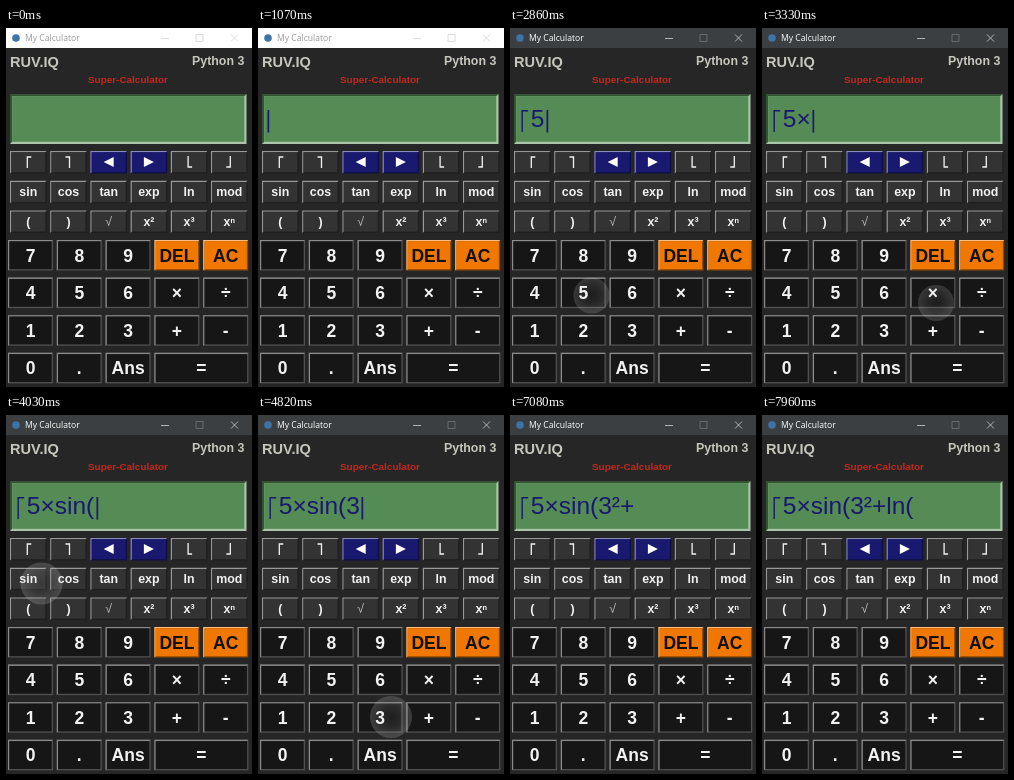
Write an HTML page that moves like this. It is 246 px wide and 359 px high and loops after 8 s.

```html
<!DOCTYPE html>
<html lang="en">
<head>
<meta charset="utf-8">
<title>My Calculator</title>
<style>
html, body { margin: 0; width: 100%; height: 100%; overflow: hidden; background: #262626; }
svg { display: block; width: 246px; height: 359px; }
text { font-family: "Liberation Sans", Arial, sans-serif; white-space: pre; }
.b { font-weight: bold; }
.bar { fill: #fff; }
.caption { fill: #999; font: 8.6px "Open Sans", sans-serif; }
.ctl { fill: none; stroke: #d2d2d2; stroke-width: .8; }
.active .bar { fill: #3c3f41; }
.active .caption { fill: #fff; }
.active .ctl { stroke: #d0d0d0; }
.active .dim { stroke: #757575; }
.key { text-anchor: middle; font-weight: bold; fill: #f2f2f2; }
.sign { fill: none; stroke: #f2f2f2; stroke-width: 1.3; }
</style>
</head>
<body>
<svg id="stage" viewBox="0 0 246 359">
  <radialGradient id="glow">
    <stop offset="0" stop-color="#ddd" stop-opacity=".04"/>
    <stop offset=".5" stop-color="#ddd" stop-opacity=".1"/>
    <stop offset="1" stop-color="#ddd" stop-opacity=".2"/>
  </radialGradient>
  <rect width="246" height="359" fill="#262626"/>
  <g id="window">
    <rect class="bar" width="246" height="20"/>
    <circle cx="10" cy="10" r="3.8" fill="#3d74a8"/>
    <text class="caption" x="19" y="13.4">My Calculator</text>
    <path class="ctl" d="M155 10.5h8M225 6.5l7 7m0-7l-7 7"/>
    <path class="ctl dim" d="M190 6.5h7v7h-7z"/>
  </g>
  <text class="b" x="4" y="39" font-size="14.6" fill="#c6c6bc">RUV.IQ</text>
  <text class="b" x="186" y="37.3" font-size="12.4" fill="#c6c6bc">Python 3</text>
  <text class="b" x="82" y="55" font-size="9.93" fill="#c5281c">Super-Calculator</text>

  <g id="panel"></g>
  <path id="ceil" d="M12.2 104V82.8h6" fill="none" stroke="#191970" stroke-width="1.4"/>
  <text id="entry" x="20.8" y="99.2" font-size="24.5" fill="#191970"></text>
  <rect id="caret" y="82" width="1.7" height="22.5" fill="#191970"/>

  <g id="keys"></g>
  <circle id="press" fill="url(#glow)"/>
</svg>
<script>
const byId = id => document.getElementById(id);
const keys = byId('keys');

function add(parent, tag, attrs, text = '') {
  const el = document.createElementNS('http://www.w3.org/2000/svg', tag);
  for (const name in attrs) el.setAttribute(name, attrs[name]);
  el.textContent = text;
  parent.append(el);
}

// Light and dark edge colours derived from a face colour.
function shades(face) {
  const rgb = face.map(v => v / 255);
  const veryDark = rgb[0] ** 2 / 2 + rgb[1] ** 2 + rgb[2] ** 2 * .28 < .05;
  const light = face.map(v => Math.min(255, Math.max(v * 1.4, (255 + v) / 2)));
  const dark = face.map(v => veryDark ? (255 + 3 * v) / 4 : v * .6);
  return [light, dark].map(css);
}
const css = rgb => `rgb(${rgb.map(Math.round)})`;

// Bevelled box; the first edge colour is on the top and left.
function bevel(parent, x, y, w, h, b, face, [topLeft, bottomRight]) {
  add(parent, 'rect', { x, y, width: w, height: h, fill: bottomRight });
  add(parent, 'path', {
    d: `M${x} ${y + h}V${y}h${w}l${-b} ${b}H${x + b}V${y + h - b}z`, fill: topLeft
  });
  add(parent, 'rect', { x: x + b, y: y + b, width: w - 2 * b, height: h - 2 * b, fill: css(face) });
}

const button = (x, y, w, h, face) => bevel(keys, x, y, w, h, 1.3, face, shades(face));

const label = (text, x, y, size, extra) =>
  add(keys, 'text', { class: 'key', x, y, 'font-size': size, ...extra }, text);

const green = [85, 139, 85], navy = [25, 25, 112], orange = [240, 120, 0];
const grey = [51, 51, 51], black = [22, 22, 22];

bevel(byId('panel'), 4, 66, 236.5, 50, 2.2, green, shades(green).reverse());

// Signs drawn as paths, relative to the key centre.
const signs = {
  '⌈': 'M-1 6V-5H3', '⌉': 'M1 6V-5H-3', '⌊': 'M-1-6V5H3', '⌋': 'M1-6V5H-3',
  '◄': 'M-5 0L5-5V5z', '►': 'M5 0L-5-5V5z'
};

const smallRows = ['⌈ ⌉ ◄ ► ⌊ ⌋', 'sin cos tan exp ln mod', '( ) √ x² x³ xⁿ'];
smallRows.forEach((row, r) => row.split(' ').forEach((name, c) => {
  const x = 4 + c * 40.2, y = 123 + r * 29.7, cx = x + 18.3, cy = y + 11;
  const arrow = name === '◄' || name === '►';
  button(x, y, 36.6, 22.5, arrow ? navy : grey);
  if (signs[name]) {
    add(keys, 'path', {
      d: signs[name], transform: `translate(${cx} ${cy})`,
      class: arrow ? '' : 'sign', fill: arrow ? '#fff' : 'none'
    });
  } else if (name === '√') {
    label(name, cx, cy + 4.6, 12.4, { style: 'font-weight:normal;fill:#c0c0c0' });
  } else {
    label(name, cx, cy + 4.3, 12.4);
  }
}));

const bigRows = ['7 8 9 DEL AC', '4 5 6 × ÷', '1 2 3 + -', '0 . Ans ='];
bigRows.forEach((row, r) => row.split(' ').forEach((name, c) => {
  const x = 2 + c * 48.8, y = 212 + r * 37.6;
  const w = name === '=' ? 94 : 45;
  const clear = name === 'DEL' || name === 'AC';
  button(x, y, w, 30.5, clear ? orange : black);
  label(name, x + w / 2, y + 21.6, 17.5, clear ? { style: 'fill:#111' } : {});
}));

// Each click: start, end of the highlight, its centre, typed text, caret place after it.
const clicks = [
  [2000, 2230, 22, 138, '', 21],
  [2780, 3020, 81.5, 267.5, '5', 36],
  [3240, 3490, 174, 275, '×', 50],
  [4030, 4270, 35.5, 168.5, 'sin(', 90],
  [4820, 5060, 133, 302, '3', 103],
  [5280, 5530, 152, 199, '²', 112],
  [6220, 6390, 173, 301, '+', 126],
  [7630, 7880, 190, 174, 'ln(', 153]
];
const blinks = [210, 630, 1070, 1450, 1840, 2230, 2700, 3100, 3240, 3890, 4030,
  4670, 4820, 5530, 5920, 6390, 6700, 7080, 7480, 7960];
const radii = [21, 18, 13.5], alphas = [1, .85, .5];

const show = (el, on) => el.setAttribute('visibility', on ? 'visible' : 'hidden');
const win = byId('window'), ceil = byId('ceil'), entry = byId('entry');
const caret = byId('caret'), press = byId('press');

function draw(now) {
  const t = now % 8000;
  const done = clicks.filter(c => c[0] <= t);
  const last = done[done.length - 1];

  win.setAttribute('class', t >= 1930 ? 'active' : '');
  show(ceil, last);
  entry.textContent = done.map(c => c[4]).join('');
  caret.setAttribute('x', (last ? last[5] : 9) + .5);
  show(caret, blinks.filter(b => b <= t).length % 2);

  const lit = last && t < last[1];
  show(press, lit);
  if (lit) {
    const step = Math.min(2, Math.floor((t - last[0]) / 80));
    press.setAttribute('cx', last[2]);
    press.setAttribute('cy', last[3]);
    press.setAttribute('r', radii[step]);
    press.setAttribute('opacity', alphas[step]);
  }
}

const start = performance.now();
function tick() {
  draw(performance.now() - start);
  requestAnimationFrame(tick);
}
tick();
</script>
</body>
</html>
```
